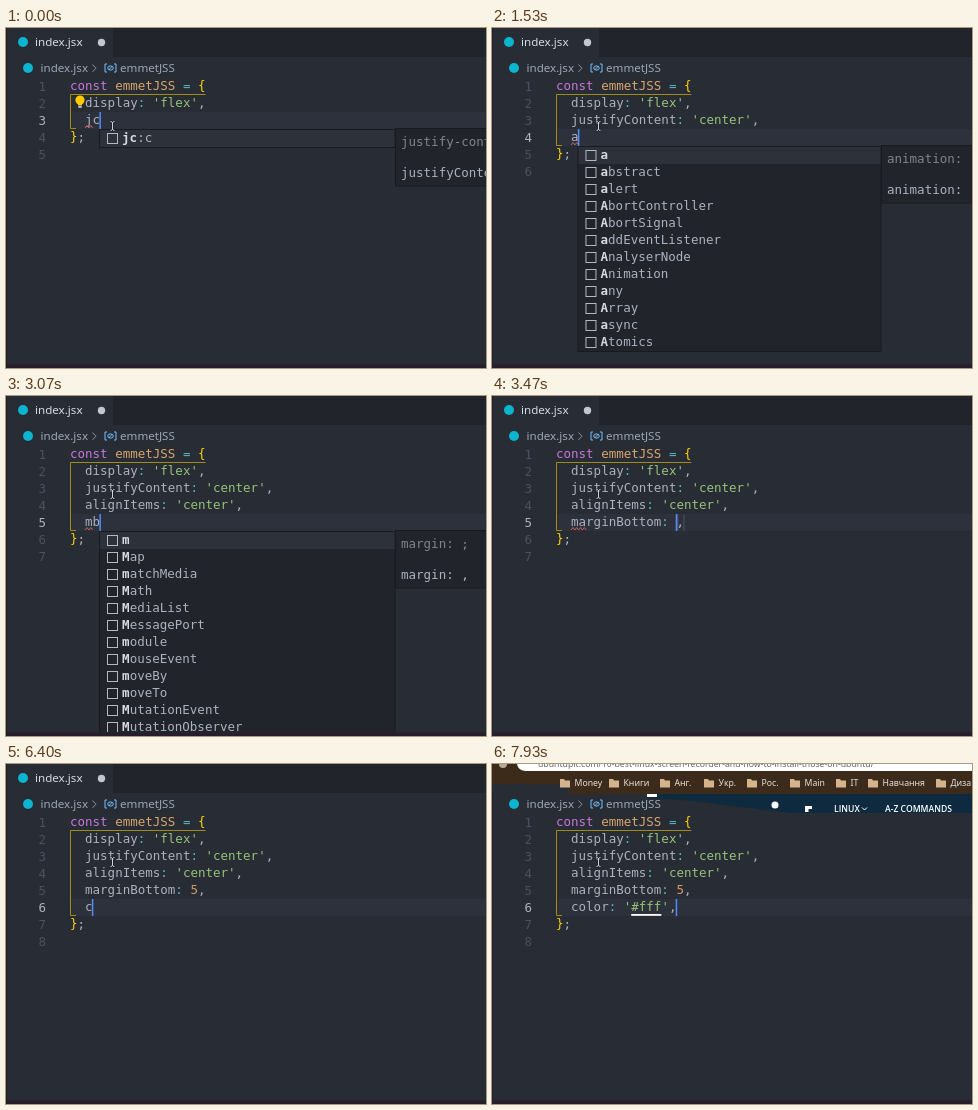
Animation of 480x340 px, one loop 8000 ms. Source, as an HTML page:

```html
<!DOCTYPE html>
<html lang="en">
<head>
<meta charset="utf-8">
<title>Emmet in JSS</title>
<style>
  html, body { margin: 0; width: 100%; height: 100%; overflow: hidden; background: #282c34; }
  svg { display: block; width: 480px; height: 340px; }
  text { white-space: pre; }
  .code { font: 12.5px "DejaVu Sans Mono", monospace; fill: #abb2bf; }
  .ui { font: 11.6px "Noto Sans", "Open Sans", sans-serif; fill: #9da5b4; }
  .marks { font: 500 8.7px "Noto Sans", sans-serif; fill: #e9e2d8; }
  .menu { font: 600 8.6px "Open Sans", sans-serif; fill: #fff; }
  .num { fill: #495162; text-anchor: end; }
  .now { fill: #abb2bf; }
  .key { fill: #c678dd; }
  .name { fill: #d9a66c; }
  .op { fill: #56b6c2; }
  .brace { fill: #ffd700; }
  .str { fill: #98c379; }
  .val { fill: #d19a66; }
  .dim { fill: #7f848e; }
  .b { font-weight: bold; fill: #d7dae0; }
</style>
</head>
<body>
<svg viewBox="0 0 480 340">
  <rect width="480" height="340" fill="#282c34"/>
  <rect x="107" width="373" height="29" fill="#21252b"/>
  <circle cx="17" cy="14" r="5" fill="#0bb4cf"/>
  <text class="ui" x="29" y="18" style="fill:#d7dae0">index.jsx</text>
  <circle cx="95.5" cy="14.5" r="3.7" fill="#c3c6cc"/>

  <circle cx="22" cy="40" r="5" fill="#0bb4cf"/>
  <text class="ui" x="34.5" y="44">index.jsx</text>
  <path d="M86.5 36.5l3.5 3.7-3.5 3.7" fill="none" stroke="#8b919d"/>
  <g fill="none" stroke="#75beff">
    <path d="M101 36h-2v8h2M108 36h2v8h-2"/>
    <ellipse cx="104.5" cy="40" rx="2.8" ry="2.1"/>
    <path d="M102.5 42l4-4"/>
  </g>
  <text class="ui" x="114" y="44">emmetJSS</text>

  <g id="editor"></g>

  <g fill="none">
    <path d="M104.5 93.5q2 0 2 1.5v6q0 1.5-2 1.5M108.5 93.5q-2 0-2 1.5v6q0 1.5 2 1.5" stroke="#15171b" stroke-width="2"/>
    <path d="M104.5 93.5q2 0 2 1.5v6q0 1.5-2 1.5M108.5 93.5q-2 0-2 1.5v6q0 1.5 2 1.5" stroke="#d5d7da" stroke-width=".9"/>
  </g>
  <rect y="336" width="480" height="1.5" fill="#21252b"/>
  <rect y="337.5" width="480" height="2.5" fill="#2a1c2a"/>
  <rect width="1" height="340" fill="#1d2026"/>

  <g id="web" visibility="hidden">
    <path d="M0 0H480V30H77V20H0Z" fill="#3c2b1b"/>
    <rect y="20" width="77" height="9" fill="#282c34"/>
    <path d="M25 0H480V7H33Q26 6 25 0Z" fill="#fff"/>
    <circle cx="11" cy="0" r="4" fill="#b9aa98"/>
    <text x="46" y="2.5" style="font:8.7px 'Noto Sans',sans-serif" fill="#666">ubuntupit.com/10-best-linux-screen-recorder-and-how-to-install-those-on-ubuntu/</text>
    <path d="M155 30H480V49H300L276 46 232 41 205 37 155 34Z" fill="#0d2a3e"/>
    <path d="M155 30h10v3h-10zM313 42h7v3h-3.500v3h-3.500z" fill="#fff"/>
    <circle cx="283" cy="41" r="3.500" fill="#fff"/>
    <g id="marks" class="marks"></g>
    <text class="menu" x="342" y="48">LINUX</text>
    <path d="M370 43.500l2.500 2.500 2.500-2.500" fill="none" stroke="#fff"/>
    <text class="menu" x="393" y="48">A-Z COMMANDS</text>
  </g>
</svg>

<script>
const LOOP = 8000, LEFT = 64, CH = 7.525, ROW = 17;
const $ = id => document.getElementById(id);
const top_ = n => 33 + ROW * n;
const base = n => 45.3 + ROW * n;
const colX = c => LEFT + c * CH;

const done = ["display: 'flex',", "justifyContent: 'center',", "alignItems: 'center',", "marginBottom: 5,"];
const lists = {
  a: 'a abstract alert AbortController AbortSignal addEventListener AnalyserNode Animation any Array async Atomics',
  m: 'm Map matchMedia Math MediaList MessagePort module MouseEvent moveBy moveTo MutationEvent MutationObserver',
  mb: 'mb moveBy menubar MutationObserver MediaError MessageEvent MimeType MediaList MouseEvent matchMedia MediaStream module',
  c: 'c caches case catch class clearInterval clearTimeout close closed confirm console const'
};
const pop = (rows, head, doc) => ({ rows: rows.split(' '), head, doc });
const aList = pop(lists.a, 'animation: ;', "animation: '',");
const mList = pop(lists.m, 'margin: ;', 'margin: ,');
const mbHelp = ['margin-bottom: ;', 'marginBottom: ,'];
const cList = pop(lists.c, 'color: #000;', "color: '#000',");

// [start ms, finished lines, text of the current line, extras]
const steps = [
  [0, 1, 'jc', { pop: pop('jc:c', 'justify-content: center;', "justifyContent: 'center',"), bulb: 1, wave: 1 }],
  [330, 1, done[1], { bulb: 1 }],
  [400, 1, done[1], {}],
  [600, 2, '', {}],
  [930, 2, 'a', {}],
  [1130, 2, 'a', { pop: aList }],
  [1530, 2, 'a', { pop: aList, wave: 1 }],
  [1800, 2, 'ai', { pop: pop('ai:c', 'align-items: center;', "alignItems: 'center',"), wave: 1 }],
  [2070, 2, done[2], {}],
  [2330, 3, '', {}],
  [2600, 3, 'm', {}],
  [2730, 3, 'm', { pop: mList }],
  [3000, 3, 'mb', { pop: mList, wave: 1 }],
  [3130, 3, 'mb', { pop: pop(lists.mb, ...mbHelp), wave: 2 }],
  [3270, 3, 'mb', { pop: pop('mb', ...mbHelp), wave: 2 }],
  [3470, 3, 'marginBottom: ,', { col: 14, stop: 1, wave: 2 }],
  [3800, 3, done[3], { col: 15, stop: 1, wave: 2 }],
  [4000, 3, done[3], {}],
  [4530, 3, done[3], { off: 1 }],
  [5000, 4, '', {}],
  [5530, 4, '', { off: 1 }],
  [6000, 4, '', {}],
  [6400, 4, 'c', {}],
  [6530, 4, 'c', { pop: cList }],
  [6930, 4, "color: '#',", { col: 9, stop: 1 }],
  [7200, 4, "color: '#',", { col: 9, stop: 1, off: 1 }],
  [7400, 4, "color: '#f',", { col: 10, stop: 1 }],
  [7530, 4, "color: '#ff',", { col: 11, stop: 1 }],
  [7670, 4, "color: '#fff',", { col: 12, stop: 1 }],
  [7800, 4, "color: '#fff',", {}],
  [7870, 4, "color: '#fff',", { swatch: 1 }],
  [7930, 4, "color: '#fff',", { swatch: 1, web: 1 }]
];

const span = (cls, s) => `<tspan class="${cls}">${s}</tspan>`;
const text = (x, y, s, cls = '') => `<text class="code ${cls}" x="${x}" y="${y}">${s}</text>`;
const rect = (x, y, w, h, fill, more = '') => `<rect x="${x}" y="${y}" width="${w}" height="${h}" fill="${fill}" ${more}/>`;
const line = (d, color, w = 1) => `<path d="${d}" fill="none" stroke="${color}" stroke-width="${w}"/>`;
const paint = s => s.replace(/'[^']*'|:|\b\d+/g, m =>
  span(m[0] === "'" ? 'str' : m === ':' ? 'op' : 'val', m));

function popup(p, n, typed) {
  const x = colX(2 + typed.length) - .6, y = top_(n + 1), w = 389 - x;
  let out = rect(x, y + .5, w, p.rows.length * ROW + 1, '#21252b', 'stroke="#181a1f"');
  out += rect(x + .5, y + 1, w - 1, ROW, '#2c313a');
  p.rows.forEach((r, i) => {
    const hit = r.toLowerCase().startsWith(typed) ? typed.length : 1;
    const ry = y + i * ROW;
    out += rect(x + 8, ry + 4.5, 10, 10, 'none', 'stroke="#b4b8c0"')
      + text(x + 22.6, ry + 13.3, span('b', r.slice(0, hit)) + r.slice(hit));
  });
  return out + rect(389.5, y - .5, 100, 57.5, '#21252b', 'stroke="#181a1f"')
    + text(395, y + 16.5, p.head, 'dim') + text(395, y + 47.500, p.doc);
}

function draw([, n, cur, o]) {
  const at = n + 2, y = top_(at), foot = y + ROW;
  const caret = colX(2 + (o.col ?? cur.length));
  let out = rect(LEFT, y, 416, ROW, '#2c313c');

  for (let i = 1; i <= at + 2; i++)
    out += text(40, base(i) + .8, i, i === at ? 'num now' : 'num');
  out += line(`M199.500 66.500H64.500V${foot - .5}H70`, '#a18b16');

  out += text(LEFT, base(1), `${span('key', 'const')} ${span('name', 'emmetJSS')} ${span('op', '=')} ${span('brace', '{')}`);
  [...done.slice(0, n), cur].forEach((s, i) => out += text(colX(2), base(i + 2), paint(s)));
  out += text(LEFT, base(at + 1), span('brace', '}') + ';');

  if (o.wave) {
    const zig = 'l1.900-2.500 1.900 2.500'.repeat(o.wave * 2);
    out += line(`M${colX(2)} ${foot - 1}${zig}`, '#c8605f');
  }
  if (o.stop) {
    out += rect(caret, y + .5, 2, ROW - 1, '#4b5263')
      + rect(colX(2 + cur.length) - .5, y + .5, 1, ROW - 1, '#4b5263');
  }
  if (o.swatch) out += rect(colX(10), foot - 2, 4 * CH, 1.8, '#fff');
  if (!o.off) out += rect(caret - .7, y, 1.5, ROW, '#528bff');
  if (o.bulb) {
    out += '<circle cx="74" cy="72" r="4.600" fill="#ffcc00"/>'
      + rect(72, 75.5, 4, 2, '#ffcc00') + rect(72.300, 78, 3.4, 1.8, '#c5c5c5');
  }
  if (o.pop) out += popup(o.pop, at, cur);
  $('editor').innerHTML = out;
  $('web').setAttribute('visibility', o.web ? 'visible' : 'hidden');
}

const marks = [[68, 'Money'], [117, 'Книги'], [168, 'Анг.'], [212, 'Укр.'], [255, 'Рос.'],
  [298, 'Main'], [344, 'IT'], [376, 'Навчання'], [444, 'Дизайн']];
$('marks').innerHTML = marks.map(([x, s]) =>
  `<path d="M${x} 15h4l1 1.500h5v7h-10z" fill="#d3b48c"/><text x="${x + 14.5}" y="22">${s}</text>`).join('');

let shown;
function tick() {
  const t = performance.now() % LOOP;
  const step = steps.findLast(s => s[0] <= t);
  if (step !== shown) draw(shown = step);
  requestAnimationFrame(tick);
}
tick();
</script>
</body>
</html>
```
